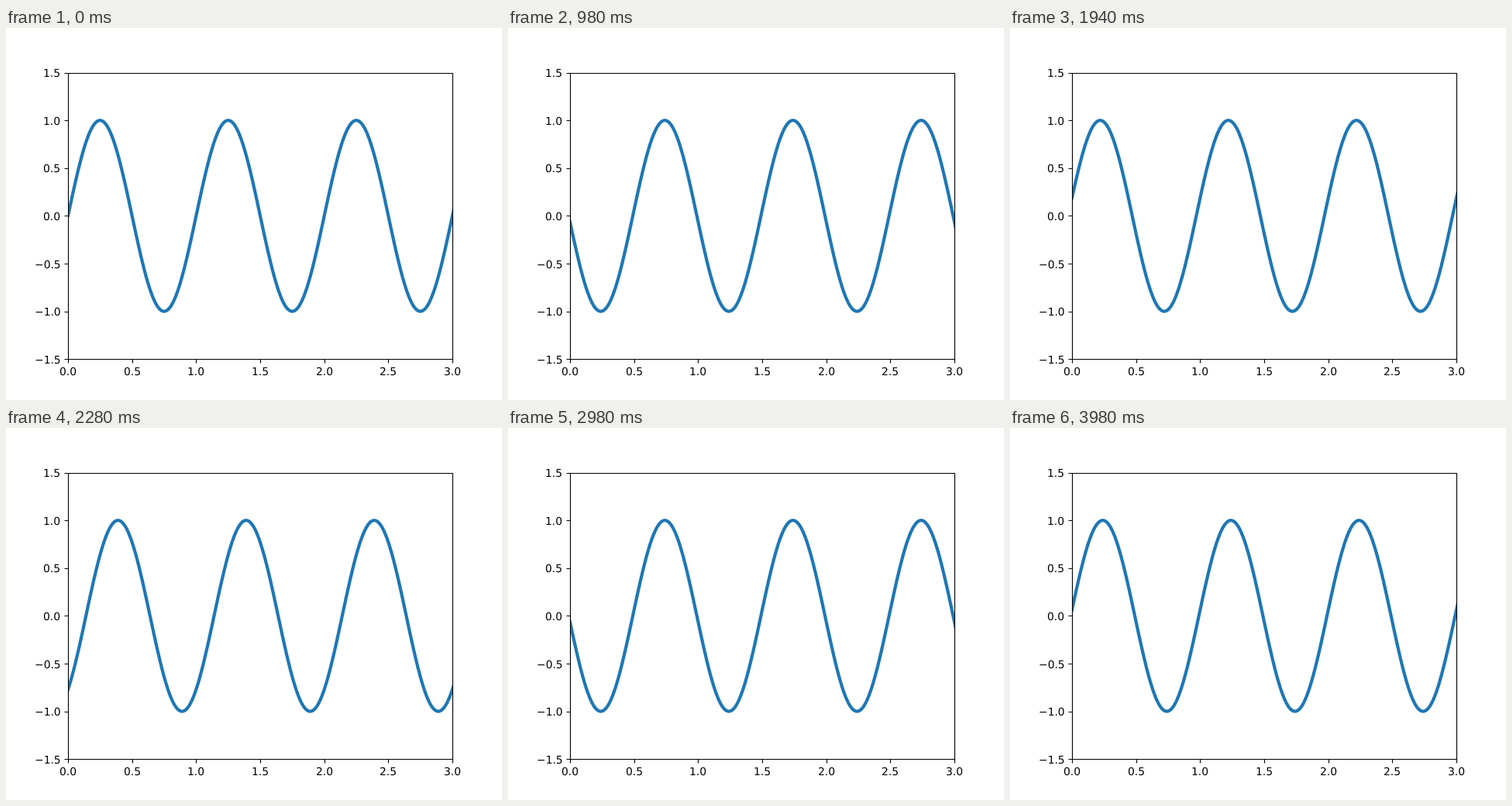
Write an HTML page that moves like this. It is 640x480 px and loops after 4000 ms.

```html
<!DOCTYPE html>
<html lang="en">
<head>
<meta charset="utf-8">
<title>Travelling sine wave</title>
<style>
  html, body { margin: 0; width: 100%; height: 100%; overflow: hidden; background: #fff; }
  svg { display: block; }
  text { font: 13.889px "DejaVu Sans", sans-serif; text-rendering: geometricPrecision; }
  #axes { fill: none; stroke: #000; stroke-width: 1.111; }
  #wave { fill: none; stroke: #1f77b4; stroke-width: 4.167; stroke-linecap: square; stroke-linejoin: round; }
</style>
</head>
<body>
<svg width="640" height="480" viewBox="0 0 640 480">
  <clipPath id="plot"><rect x="80" y="58" width="496" height="369"/></clipPath>
  <g clip-path="url(#plot)"><path id="wave"/></g>
  <path id="axes"/>
  <g id="labels"></g>
</svg>
<script>
  const LOOP = 4000, STEP = 20, SHIFT = 0.01;
  const $ = id => document.getElementById(id);
  const px = x => 80 + x * 496 / 3;
  const py = y => 242.4 - y * 123.2;
  const snap = v => Math.round(v) + 0.5;

  function addLabel(value, x, y) {
    const el = document.createElementNS("http://www.w3.org/2000/svg", "text");
    el.setAttribute("x", Math.round(x));
    el.setAttribute("y", Math.round(y));
    el.textContent = value.toFixed(1).replace("-", "\u2212");
    $("labels").append(el);
  }

  function drawAxes() {
    let d = "M80.5 58.5H576.5V427.5H80.5Z";
    for (let i = 0; i <= 6; i++) {
      const x = i / 2, y = x - 1.5;
      d += `M${snap(px(x))} 427.5v5M80.5 ${snap(py(y))}h-5`;
      addLabel(x, px(x) - 11.04, 448);
      addLabel(y, y < 0 ? 36.56 : 48.2, py(y) + 5.51);
    }
    $("axes").setAttribute("d", d);
  }

  function drawWave(shift) {
    const points = [];
    for (let i = 0; i <= 610; i++) {
      const x = i / 200;
      const y = Math.sin(2 * Math.PI * (x - shift));
      points.push(px(x).toFixed(3) + " " + py(y).toFixed(3));
    }
    $("wave").setAttribute("d", "M" + points.join("L"));
  }

  const start = performance.now();
  function tick() {
    const t = (performance.now() - start) % LOOP;
    drawWave(Math.floor(t / STEP + 0.001) * SHIFT);
    requestAnimationFrame(tick);
  }

  drawAxes();
  tick();
</script>
</body>
</html>
```
